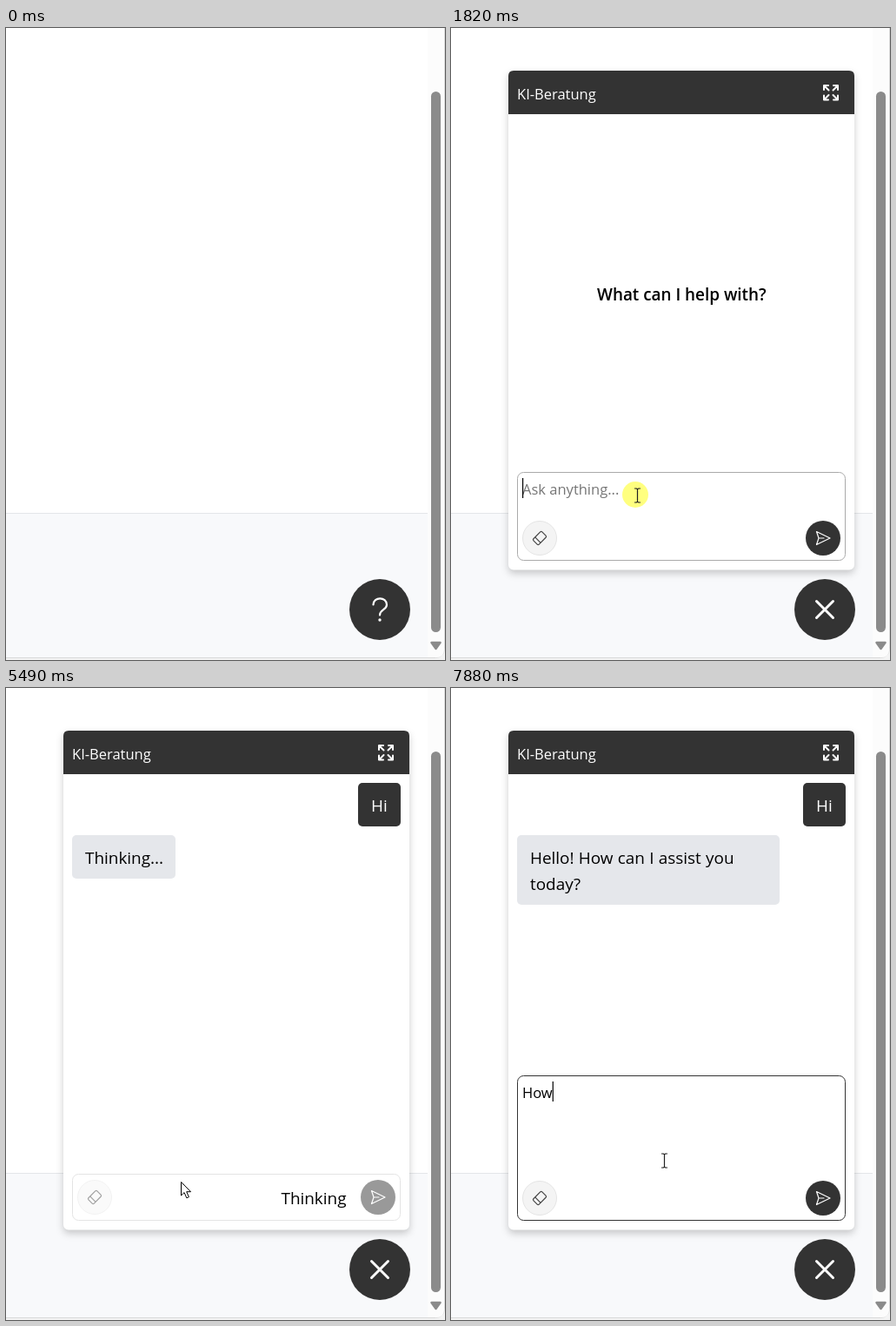
Animation of 505 by 726 pixels, one loop 8 s. Source, as an HTML page:

```html
<!DOCTYPE html>
<html lang="en">
<head>
<meta charset="utf-8">
<title>Chat widget</title>
<style>
  html, body { margin: 0; width: 100%; height: 100%; overflow: hidden; background: #f4f4f4; }
  svg { display: block; width: 505px; height: 726px; font: 18.9px "Open Sans", "Noto Sans", sans-serif; }
  text { white-space: pre; }
  .small { font-size: 16.5px; }
  .light { fill: #fff; font-weight: 500; }
  .line { fill: none; stroke: #fff; stroke-linecap: round; stroke-linejoin: round; }
  .panel { filter: drop-shadow(0 4px 4px rgba(0, 0, 0, .2)); }
</style>
</head>
<body>
<svg viewBox="0 0 505 726">
  <!-- page and scrollbar -->
  <rect x="-20" y="-20" width="524.5" height="743.5" rx="10" fill="#fff" stroke="#d8d8d8"/>
  <path d="M485 0h19v714q0 9-9 9h-10z" fill="#fcfcfc"/>
  <path d="M0 557h485v166H0z" fill="#f8f9fb"/>
  <path d="M0 557.5h485" stroke="#e4e6e9"/>
  <rect x="489" y="73" width="11" height="621" rx="5.5" fill="#8b8b8b"/>
  <path d="M489.5 706h10l-5 7z" fill="#8b8b8b" stroke="#8b8b8b" stroke-width="2.5" stroke-linejoin="round"/>

  <g id="panel">
    <g class="panel">
      <rect x="66" y="49" width="398" height="573.5" rx="6" fill="#fff"/>
      <path d="M66 99V55q0-6 6-6h386q6 0 6 6v44z" fill="#333"/>
    </g>
    <text x="76" y="82" font-size="16.5" class="light">KI-Beratung</text>
    <path class="line" stroke-width="2" d="M429 71v-5h5m-5 0l5.500 5.500M440 66h5v5m0-5l-5.500 5.500M429 77.500v5h5m-5 0l5.500-5.500M440 82.500h5v-5m0 5l-5.500-5.500"/>

    <text id="title" x="265.300" y="313" font-weight="600" text-anchor="middle">What can I help with?</text>

    <g id="sent">
      <rect x="405" y="109" width="49" height="50" rx="5" fill="#333"/>
      <text x="420" y="142" class="light">Hi</text>
    </g>
    <g id="wait">
      <rect x="76" y="169" width="119" height="50" rx="5" fill="#e5e7eb"/>
      <text x="91" y="202">Thinking...</text>
      <text x="391.500" y="593" text-anchor="end">Thinking</text>
    </g>
    <g id="reply">
      <rect x="76" y="169" width="302" height="80" rx="5" fill="#e5e7eb"/>
      <text x="91" y="202" word-spacing=".4">Hello! How can I assist you</text>
      <text x="91" y="232">today?</text>
    </g>

    <rect id="box" x="76.500" width="377" rx="7" fill="none"/>
    <text id="hint" class="small" x="82" fill="#757575">Ask anything...</text>
    <text id="typed" class="small" x="82"></text>
    <rect id="caret" width="1.200" height="23"/>

    <g id="tools">
      <circle cx="102" cy="586" r="19.500" fill="#f4f4f4" stroke="#e5e5e5"/>
      <g transform="translate(102 586) rotate(-45)" fill="none" stroke="#444" stroke-width="1.200">
        <rect x="-7" y="-4.500" width="14" height="9" rx="1.500"/>
        <path d="M-3-4.500v9"/>
      </g>
      <circle cx="428" cy="586" r="20" fill="#333"/>
      <path class="line" stroke-width="1.200" d="M420.500 578.500L436 586l-15.500 7.500 2.500-7.500zM423 586h6"/>
    </g>
  </g>

  <circle cx="430" cy="668" r="35" fill="#333"/>
  <g id="ask">
    <path class="line" stroke-width="2.200" d="M422.500 662.500c0-9.500 15.500-9.500 15.500 0 0 6-8 5.500-8 12"/>
    <circle cx="430" cy="680" r="1.700" fill="#fff"/>
  </g>
  <path id="close" class="line" stroke-width="3" d="M420.500 658.500l19 19m0-19l-19 19"/>

  <g id="mouse">
    <circle id="click" r="15" fill="#ff0" fill-opacity=".5"/>
    <path id="arrow" fill="#fff" stroke="#000" d="M.5.5v15.500l3.600-3.400 2.700 6.200 2.600-1.100-2.700-6h4.800z"/>
    <g id="hand" stroke="#000" transform="translate(0 1) scale(.9)">
      <path fill="#fff" d="M-2 1.500Q-2 0 0 0T2 1.500V8.500l6 1.500q2 .6 2 3v4q0 2-1.500 4v4.500h-10v-4l-4-6q-1.500-2.500.5-3.200 1.500-.2 3 2.500z"/>
      <path d="M2 8v4M5 9.500V13M7.500 10.500V13.500"/>
    </g>
    <path id="beam" fill="none" stroke="#222" stroke-width="1.200" d="M-1-7h2.500l1 1 1-1H6M2.500-6V8M-1 9h2.500l1-1 1 1H6"/>
  </g>
</svg>
<script>
const LOOP = 8000;
const OPEN = 990, SEND = 2890, REPLY = 6180;   // ms
const HOVER = 140, GROW = 260, PRESS = 250;
const clicks = [850, 1750, 7070];

const $ = id => document.getElementById(id);
const show = (id, on) => { $(id).style.display = on ? "" : "none"; };
const put = (id, attrs) => {
  for (const name in attrs) $(id).setAttribute(name, attrs[name]);
};
const clamp = p => Math.max(0, Math.min(1, p));
const easeOut = p => 1 - (1 - p) ** 2;
const easeBoth = p => p * p * (3 - 2 * p);
const ramp = (t, start, length, ease = easeOut) => ease(clamp((t - start) / length));

// Each mouse move: start, length, goal
const moves = [
  [370, 480, 423, 669], [1260, 490, 212, 536], [5480, 10, 201, 567],
  [5490, 490, 341, 569], [6650, 420, 243, 542]
];
function mouseAt(t) {
  let x = 350, y = 735;
  for (const [start, length, goalX, goalY] of moves) {
    const p = ramp(t, start, length, easeBoth);
    x += (goalX - x) * p;
    y += (goalY - y) * p;
  }
  return [x, y];
}

const typeOut = (word, t, start, gap) => word.slice(0, Math.max(0, Math.floor((t - start) / gap) + 1));

function draw(t) {
  const open = t >= OPEN;
  const sent = t >= SEND;
  const waiting = sent && t < REPLY;
  const text = sent ? typeOut("How", t, 7680, 100) : typeOut("Hi", t, 2290, 200);

  show("panel", open);
  show("close", open);
  show("ask", !open);
  show("title", !sent);
  show("sent", sent);
  show("wait", waiting);
  show("reply", sent && !waiting);

  // The box grows and darkens on focus, and greys on hover
  const grown = ramp(t, 1900, GROW) - sent + ramp(t, 7220, GROW);
  const blur = ramp(t, SEND, HOVER);
  const focus = ramp(t, 1900, GROW) - blur + ramp(t, 7220, GROW);
  const hover = ramp(t, 1540, HOVER) - blur + ramp(t, 5490, HOVER);
  const grey = 229 - 59 * hover - 119 * focus;
  const top = 510.5 - 65 * grown + 48 * waiting;
  put("box", { y: top, height: 611.5 - top, stroke: `rgb(${grey},${grey},${grey})` });
  put("title", { y: 313 + (top - 510.5) / 2 });

  show("hint", !waiting && !text);
  put("hint", { y: top + 25.5 });
  put("typed", { y: top + 25.5 });
  $("typed").textContent = text;
  show("caret", t >= 7140 || (t >= 1750 && !sent));
  put("caret", { x: 82 + (text ? $("typed").getComputedTextLength() : 0), y: top + 6.5 });
  put("tools", { opacity: waiting ? .5 : 1, transform: `translate(0 ${-waiting})` });

  // The pointer depends on what lies under it
  const [x, y] = mouseAt(t);
  const onButton = Math.hypot(x - 430, y - 668) < 35;
  const frozen = sent && t < REPLY + 70;
  const onBox = open && !frozen && x > 76 && x < 454 && y > top && y < 612;
  const shape = onButton ? "hand" : onBox ? "beam" : "arrow";
  for (const id of ["arrow", "hand", "beam"]) show(id, id === shape);
  show("click", clicks.some(c => t >= c && t < c + PRESS));
  put("mouse", { transform: `translate(${x} ${y})` });
}

const begin = performance.now();
function tick() {
  draw((performance.now() - begin) % LOOP);
  requestAnimationFrame(tick);
}
tick();
</script>
</body>
</html>
```
